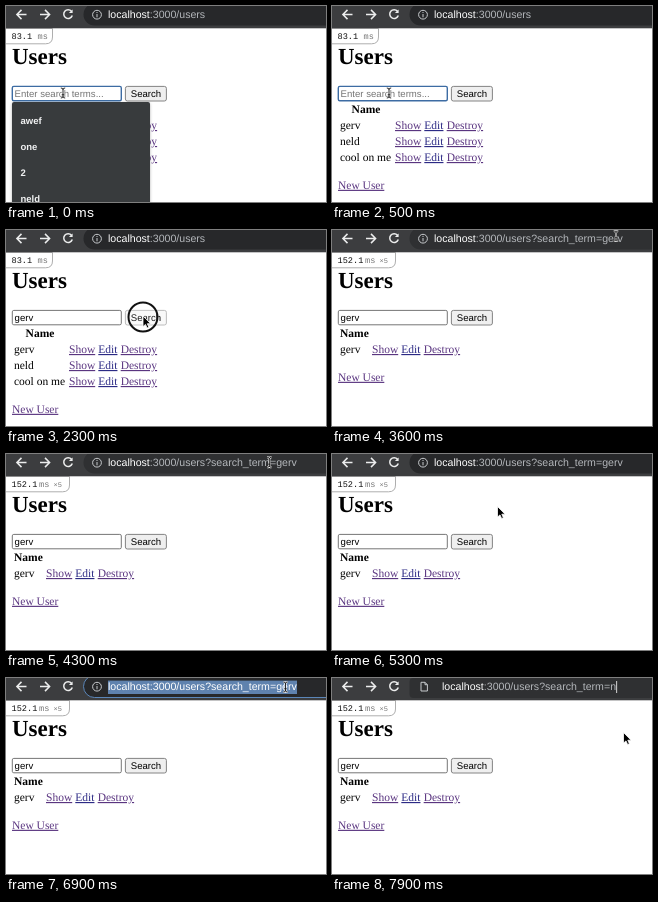
Animation of 320 by 196 pixels, one loop 8 s. Source, as an HTML page:

```html
<!DOCTYPE html>
<html lang="en">
<head>
<meta charset="utf-8">
<title>Users</title>
<style>
  html, body { margin: 0; width: 100%; height: 100%; overflow: hidden; background: #fff; }
  svg { display: block; width: 100vw; height: 100vh; }
  text { white-space: pre; text-rendering: geometricPrecision; }
  .page { font: 11.5px "Liberation Serif", serif; }
  .link { fill: #5a3580; text-decoration: underline; }
  .fresh { fill: #2c2a85; }
  .bold { font-weight: bold; }
  .control { font: 9.6px "Liberation Sans", sans-serif; }
  .menu text { font: bold 9.5px "Liberation Sans", sans-serif; fill: #f1f2f3; }
  .badge { font: 8.6px "Liberation Mono", monospace; fill: #111; }
  .url { font: 10.6px "Liberation Sans", sans-serif; fill: #b4b7bb; }
  .host { fill: #fff; }
  .selected, .selected .host { fill: #fff; }
  .icon { fill: none; stroke: #eceded; stroke-width: 1.5; }
  .muted { fill: none; stroke: #c6c9cc; stroke-width: 1; }
</style>
</head>
<body>
<svg viewBox="0 0 320 196">
  <defs>
    <g id="links">
      <text class="link" y="123">Show</text>
      <text class="link fresh" x="29.3" y="123">Edit</text>
      <text class="link" x="51.7" y="123">Destroy</text>
    </g>
    <filter id="shadow" x="-10%" y="-10%" width="120%" height="120%">
      <feDropShadow dx="0" dy="1" stdDeviation="1.5" flood-opacity=".3"/>
    </filter>
  </defs>
  <rect width="320" height="196" fill="#fff"/>

  <g class="page">
    <text class="bold" x="6" y="58.2" font-size="23">Users</text>
    <g id="all">
      <text class="bold" x="19.6" y="107">Name</text>
      <text x="8" y="123">gerv</text>
      <text x="8" y="139">neld</text>
      <text x="8" y="155">cool on me</text>
      <use href="#links" x="63"/>
      <use href="#links" x="63" y="16"/>
      <use href="#links" x="63" y="32"/>
      <text class="link" x="6" y="182.8">New User</text>
    </g>
    <g id="found">
      <text class="bold" x="8" y="107">Name</text>
      <text x="8" y="123">gerv</text>
      <use href="#links" x="40"/>
      <text class="link" x="6" y="150.8">New User</text>
    </g>
  </g>

  <g class="control">
    <rect id="field" x="6.3" y="80.4" width="109" height="14.4" rx="1.5" fill="#fff"/>
    <text id="entry" x="8.6" y="91"></text>
    <path id="caret" stroke="#000" stroke-width=".8"/>
    <rect id="button" x="119.4" y="80.4" width="41" height="14.6" rx="2" stroke-width=".9"/>
    <text x="140" y="91.2" text-anchor="middle">Search</text>
  </g>

  <g class="badge">
    <path id="badgeBox" fill="#fff" stroke="#a5a5a5" stroke-width=".9"/>
    <text id="badgeTime" x="5.5" y="33"></text>
    <text id="badgeUnit" y="33" fill="#777">ms</text>
    <text id="badgeCount" x="47.5" y="33" font-size="7" fill="#777">×5</text>
  </g>

  <g class="menu" id="menu">
    <rect x="6" y="96" width="138" height="120" rx="2" fill="#383a3d" filter="url(#shadow)"/>
    <text x="14.5" y="118">awef</text>
    <text x="14.5" y="144">one</text>
    <text x="14.5" y="170">2</text>
    <text x="14.5" y="196">neld</text>
  </g>

  <rect width="320" height="22.3" fill="#3c3d3f"/>
  <g class="icon">
    <path d="M20.5 8.5H11M15.5 3.9L10.9 8.5L15.5 13.1"/>
    <path d="M34 8.5H43.5M39 3.9L43.6 8.5L39 13.1"/>
    <path d="M65.5 5.2A4.4 4.4 0 1 0 66.3 9.6"/>
    <path d="M66.6 3.4V7.1H62.9Z" fill="#eceded" stroke="none"/>
  </g>
  <rect id="pill" x="77.5" width="270"/>
  <g class="muted" id="info">
    <circle cx="91" cy="8.7" r="4.4"/>
    <path d="M91 8V11.3M91 6V7"/>
  </g>
  <path class="muted" id="sheet" d="M89 4.3H93L95.4 6.7V13H89ZM93 4.3V6.7H95.4"/>
  <rect id="selection" x="102" y="2.6" width="189" height="13.4" fill="#5f82ae"/>
  <text class="url" id="url" y="12.4"><tspan class="host">localhost</tspan><tspan id="path"></tspan></text>
  <path id="urlCaret" stroke="#fff" stroke-width=".8"/>

  <circle id="ring" fill="#fff" fill-opacity=".12" stroke="#111" stroke-width="2"/>
  <path id="arrow" d="M0 0V10.6L2.5 8.4L4.1 12L5.9 11.2L4.3 7.7H7.6Z" fill="#000" stroke="#fff" stroke-width=".8"/>
  <g id="beam" fill="none">
    <path d="M-2.2 -5Q0 -5 0 -3.6Q0 -5 2.2 -5M0 -4V4M-2.2 5Q0 5 0 3.6Q0 5 2.2 5M-1.3 1.8H1.3" stroke="#fff" stroke-width="2"/>
    <path d="M-2.2 -5Q0 -5 0 -3.6Q0 -5 2.2 -5M0 -4V4M-2.2 5Q0 5 0 3.6Q0 5 2.2 5M-1.3 1.8H1.3" stroke="#111" stroke-width=".9"/>
  </g>
</svg>
<script>
const LOOP = 8000, STEP = 100, TERM = "gerv";
const el = id => document.getElementById(id);
const set = (id, attrs) => { for (const k in attrs) el(id).setAttribute(k, attrs[k]); };
const show = (id, on) => { el(id).style.display = on ? "" : "none"; };
const within = (t, from, to) => t >= from && t < to;

// Pointer path: time, x, y
const route = [
  [0, 57, 87], [1600, 57, 87], [1800, 105, 100], [2000, 137, 86], [2700, 137, 86],
  [3200, 267, 7], [3300, 267, 7], [3600, 284, 6], [3900, 284, 8], [4200, 284, 8],
  [4500, 222, 9], [4800, 280, 8], [4900, 280, 8], [5300, 165.5, 52.5], [6200, 165.5, 52.5],
  [6700, 279, 9], [7100, 280, 9], [7300, 291.5, 54.5], [LOOP, 291.5, 54.5]
];

function pointer(t) {
  const i = route.findIndex(p => p[0] > t);
  const [t0, x0, y0] = route[i - 1], [t1, x1, y1] = route[i];
  const k = (t - t0) / (t1 - t0);
  return [x0 + (x1 - x0) * k, y0 + (y1 - y0) * k];
}

function drawForm(t) {
  const typed = TERM.slice(0, Math.max(0, Math.floor((t - 600) / STEP)));
  const focused = t < 2200, pressed = within(t, 2200, 2400);
  el("entry").textContent = typed || "Enter search terms...";
  set("entry", { fill: typed ? "#000" : "#757575" });
  set("field", { stroke: focused ? "#3d6ca3" : "#767676", "stroke-width": focused ? 1.4 : 1 });
  show("caret", within(t, 700, 1200) || within(t, 1700, 2200));
  const x = 9.1 + el("entry").getComputedTextLength();
  set("caret", { d: `M${x} 82.5V92.5` });
  set("button", {
    fill: pressed ? "#f9f9f9" : within(t, 2000, 2900) ? "#e5e5e5" : "#efefef",
    stroke: pressed ? "#b5b5b5" : "#767676"
  });
  set("menu", { opacity: Math.max(0, 1 - Math.floor(t / STEP) * .37) });
}

function drawResult(done) {
  show("all", !done);
  show("found", done);
  show("badgeCount", done);
  const right = done ? 63.5 : 46.5;
  set("badgeBox", { d: `M0 22.5H${right}V31Q${right} 37.8 ${right - 7} 37.8H0` });
  el("badgeTime").textContent = done ? "152.1" : "83.1";
  set("badgeUnit", { x: done ? 33 : 31.5 });
}

function drawAddress(t) {
  const focused = t >= 6700, popup = t >= 7900, selected = within(t, 6700, 7100);
  const term = t < 7500 ? TERM : t < 7600 ? TERM.slice(0, 2) : t < 7800 ? "" : "n";
  const x = popup ? 110 : 102;
  el("path").textContent = ":3000/users" + (t < 2400 ? "" : "?search_term=" + term);
  set("url", { x, class: selected ? "url selected" : "url" });
  const hover = within(t, 3400, 5200) || within(t, 6600, 6700);
  set("pill", {
    y: popup ? 0 : -2.5, height: popup ? 20 : 22, rx: popup ? 4 : 11,
    fill: popup || hover ? "#2f3032" : "#27282a",
    stroke: focused && !popup ? "#5b86b8" : "none"
  });
  show("info", !popup);
  show("sheet", popup);
  show("selection", selected);
  show("urlCaret", t >= 7100);
  const end = x + .6 + el("url").getComputedTextLength();
  set("urlCaret", { d: `M${end} 3V15` });
}

function drawPointer(t) {
  const [x, y] = pointer(t);
  const overText = (x > 80 && y < 20) || (x < 116 && y > 80 && y < 95);
  const visible = !within(t, 700, 1700);
  show("beam", visible && overText);
  show("arrow", visible && !overText);
  for (const id of ["beam", "arrow"]) set(id, { transform: `translate(${x} ${y})` });
  show("ring", within(t, 2200, 2400));
  set("ring", { cx: x, cy: y + 1, r: t < 2300 ? 9 : 14.5 });
}

const start = performance.now();
function frame() {
  const t = Math.floor((performance.now() - start) % LOOP / STEP) * STEP;
  drawForm(t);
  drawResult(t >= 2400);
  drawAddress(t);
  drawPointer(t);
  requestAnimationFrame(frame);
}
frame();
</script>
</body>
</html>
```
